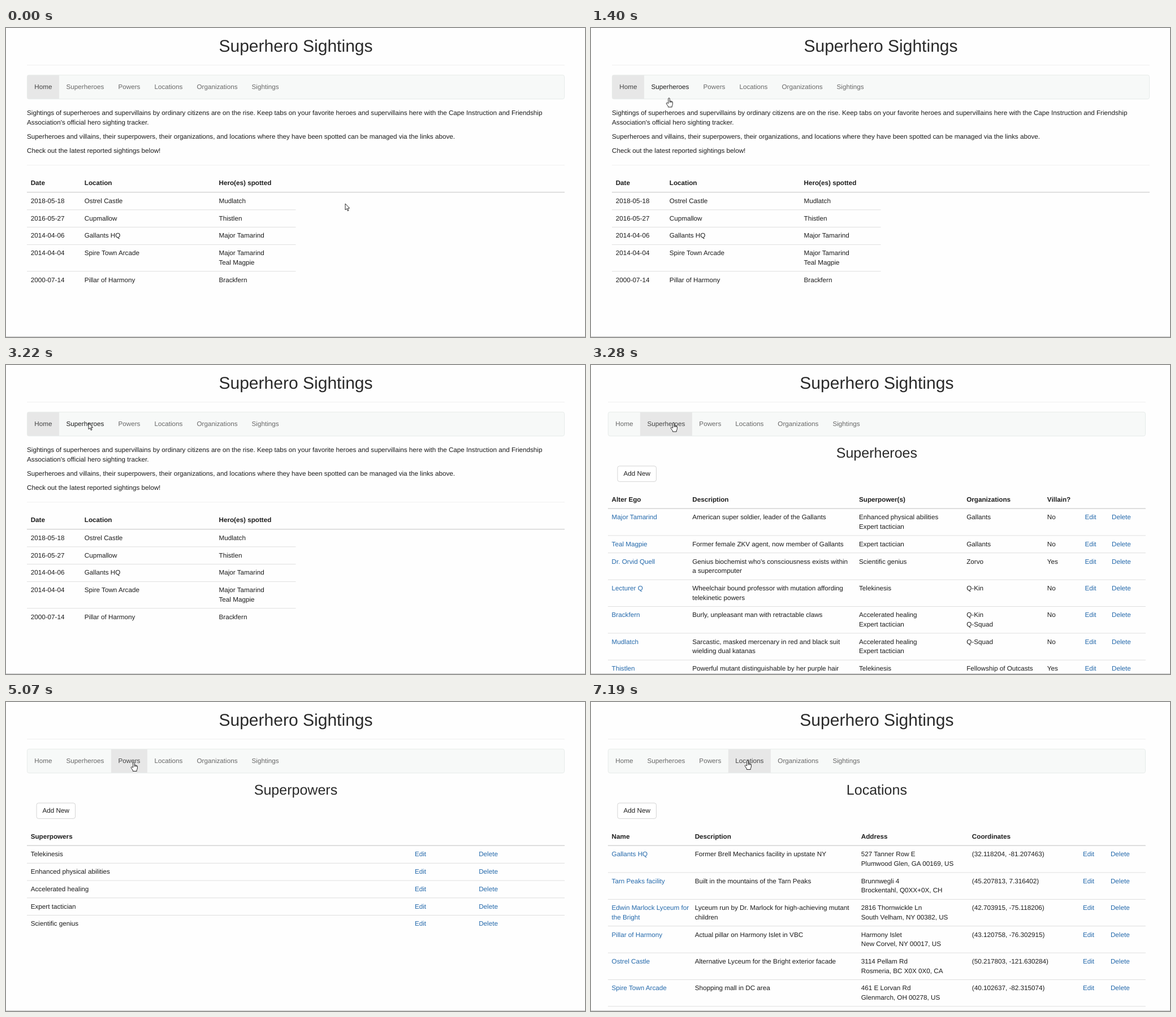
An HTML page for the animation above (8 s loop, 1024x547 px).

```html
<!DOCTYPE html>
<html lang="en">
<head>
<meta charset="utf-8">
<title>Sightings</title>
<style>
html, body { margin: 0; width: 100%; height: 100%; overflow: hidden; background: #fefefe; }
svg { display: block; width: 100vw; height: 100vh; }
text { font: 14px "Liberation Sans", Arial, sans-serif; fill: #1c1c1c; text-rendering: geometricPrecision; }
.th { font-weight: bold; }
.h1 { font-size: 36px; text-anchor: middle; fill: #2a2a2a; }
.h2 { font-size: 30px; text-anchor: middle; fill: #2a2a2a; }
.link { fill: #2469ab; }
.nav { fill: #686868; }
.hover { fill: #1c1c1c; }
.active { fill: #444; }
#cursor path { fill: #fff; stroke: #111; stroke-width: .9; stroke-linejoin: round; }
</style>
</head>
<body>
<svg viewBox="0 0 1024 547">
  <g id="pages"></g>
  <rect y="546" width="1024" height="1" fill="#c6c6c6"/>
  <g id="cursor">
    <path id="arrow" d="M0 0V11L2.6 8.8L4.3 12.8L6 12L4.3 8.2L7.6 8Z"/>
    <path id="hand" d="M-1.3 9.5V1.2Q-1.3 0 0 0T1.3 1.2V5Q2.8 4.6 3 5.6Q4.6 5.2 4.8 6.2Q6.4 6 6.4 7.6V10.5Q6.4 12.5 5.2 14V16H-1.6V14.5L-4.6 10.2Q-5.2 8.4 -3.6 8.3ZM1.3 5V8M3 5.6V8M4.8 6.2V8"/>
  </g>
</svg>
<script>
const $ = id => document.getElementById(id);
const SX = .8342, SY = .8313, LEFT = 44.35, TOP = -.9, WIDTH = 1140, LOOP = 8000;
const LINE = 20, PAD = 8, NAV_PAD = 15, NAV_TOP = 100.6, BODY_TOP = NAV_TOP + 72;
const NAV = ['Home', 'Superheroes', 'Powers', 'Locations', 'Organizations', 'Sightings'];

function make(tag, attrs = {}, content = '') {
  const el = document.createElementNS('http://www.w3.org/2000/svg', tag);
  for (const k in attrs) el.setAttribute(k, attrs[k]);
  el.textContent = content;
  return el;
}
function add(parent, ...spec) {
  const el = make(...spec);
  parent.append(el);
  return el;
}
const rect = (g, x, y, width, height, fill, more) => add(g, 'rect', { x, y, width, height, fill, ...more });
// y is the middle of the line box
const label = (g, x, y, s, cls = '', size = 14) => add(g, 'text', { x, y: y + size * .3465 - .7, class: cls }, s);

// Column weights share the full width; cells break lines at "|"
function table(g, top, weights, head, rows, linked = () => false, lineWidth = WIDTH) {
  const total = weights.reduce((a, b) => a + b);
  let sum = 0;
  const cols = weights.map(w => PAD + WIDTH * ((sum += w) - w) / total);
  const middle = PAD + LINE / 2;
  head.forEach((s, i) => label(g, cols[i], top + middle, s, 'th'));
  let y = top + LINE + 2 * PAD;
  rect(g, 0, y, WIDTH, 2, '#d9d9d9');
  y += 2;
  rows.forEach((row, r) => {
    if (r) rect(g, 0, y - 1, lineWidth, 1, '#d9d9d9');
    const cells = row.map(cell => cell.split('|'));
    cells.forEach((lines, i) => lines.forEach((s, n) =>
      label(g, cols[i], y + middle + LINE * n, s, linked(i) ? 'link' : '')));
    y += 2 * PAD + 1 + LINE * Math.max(...cells.map(lines => lines.length));
  });
}

// A page tall enough to scroll is shifted by half a scrollbar
function page(active, shift, heading) {
  const g = add($('pages'), 'g', { transform: `scale(${SX} ${SY}) translate(${LEFT - shift} ${TOP})` });
  label(g, WIDTH / 2, 39.8, 'Superhero Sightings', 'h1', 36);
  rect(g, 0, 79.6, WIDTH, 1, '#ebebeb');
  rect(g, .5, NAV_TOP + .5, WIDTH - 1, 51, '#f7f9f8', { rx: 4, stroke: '#e2e8e6' });
  const highlight = rect(g, 0, NAV_TOP + 1, 0, 50, '#e7e7e7');
  const edges = [1];
  const links = NAV.map((s, i) => {
    const link = label(g, edges[i] + NAV_PAD, NAV_TOP + 26, s);
    edges.push(edges[i] + link.getComputedTextLength() + 2 * NAV_PAD);
    return link;
  });
  highlight.setAttribute('x', edges[active]);
  highlight.setAttribute('width', edges[active + 1] - edges[active]);
  if (heading) {
    label(g, WIDTH / 2, BODY_TOP + 16.5, heading, 'h2', 30);
    rect(g, 20.5, BODY_TOP + 43.5, 82, 33, '#fff', { rx: 4, stroke: '#ccc' });
    label(g, 33, BODY_TOP + 60, 'Add New');
  }
  return { g, active, shift, links, edges };
}

const home = page(0, 0);
let introY = BODY_TOP + LINE / 2;
for (const paragraph of [
  'Sightings of superheroes and supervillains by ordinary citizens are on the rise. Keep tabs on your favorite heroes and supervillains here with the Cape Instruction and Friendship|Association\'s official hero sighting tracker.',
  'Superheroes and villains, their superpowers, their organizations, and locations where they have been spotted can be managed via the links above.',
  'Check out the latest reported sightings below!'
]) {
  for (const s of paragraph.split('|')) {
    label(home.g, 0, introY, s);
    introY += LINE;
  }
  introY += 10;
}
rect(home.g, 0, introY, WIDTH, 1, '#ebebeb');
table(home.g, introY + 21, [10, 25, 65], ['Date', 'Location', 'Hero(es) spotted'], [
  ['2018-05-18', 'Ostrel Castle', 'Mudlatch'],
  ['2016-05-27', 'Cupmallow', 'Thistlen'],
  ['2014-04-06', 'Gallants HQ', 'Major Tamarind'],
  ['2014-04-04', 'Spire Town Arcade', 'Major Tamarind|Teal Magpie'],
  ['2000-07-14', 'Pillar of Harmony', 'Brackfern']
], undefined, WIDTH / 2);

const LIST_TOP = BODY_TOP + 97;
const edit = row => [...row, 'Edit', 'Delete'];

const heroes = page(1, 8.5, 'Superheroes');
table(heroes.g, LIST_TOP, [15, 31, 20, 15, 7, 5, 7],
  ['Alter Ego', 'Description', 'Superpower(s)', 'Organizations', 'Villain?'], [
  ['Major Tamarind', 'American super soldier, leader of the Gallants', 'Enhanced physical abilities|Expert tactician', 'Gallants', 'No'],
  ['Teal Magpie', 'Former female ZKV agent, now member of Gallants', 'Expert tactician', 'Gallants', 'No'],
  ['Dr. Orvid Quell', "Genius biochemist who's consciousness exists within|a supercomputer", 'Scientific genius', 'Zorvo', 'Yes'],
  ['Lecturer Q', 'Wheelchair bound professor with mutation affording|telekinetic powers', 'Telekinesis', 'Q-Kin', 'No'],
  ['Brackfern', 'Burly, unpleasant man with retractable claws', 'Accelerated healing|Expert tactician', 'Q-Kin|Q-Squad', 'No'],
  ['Mudlatch', 'Sarcastic, masked mercenary in red and black suit|wielding dual katanas', 'Accelerated healing|Expert tactician', 'Q-Squad', 'No'],
  ['Thistlen', 'Powerful mutant distinguishable by her purple hair', 'Telekinesis', 'Fellowship of Outcasts', 'Yes']
].map(edit), i => i === 0 || i > 4);

const powers = page(2, 0, 'Superpowers');
table(powers.g, LIST_TOP, [60, 10, 14], ['Superpowers'],
  ['Telekinesis', 'Enhanced physical abilities', 'Accelerated healing', 'Expert tactician', 'Scientific genius']
    .map(s => edit([s])), i => i > 0);

const places = page(3, 8.5, 'Locations');
table(places.g, LIST_TOP, [15, 30, 20, 20, 5, 7], ['Name', 'Description', 'Address', 'Coordinates'], [
  ...[
    ['Gallants HQ', 'Former Brell Mechanics facility in upstate NY', '527 Tanner Row E|Plumwood Glen, GA 00169, US', '(32.118204, -81.207463)'],
    ['Tarn Peaks facility', 'Built in the mountains of the Tarn Peaks', 'Brunnwegli 4|Brockentahl, Q0XX+0X, CH', '(45.207813, 7.316402)'],
    ['Edwin Marlock Lyceum for|the Bright', 'Lyceum run by Dr. Marlock for high-achieving mutant|children', '2816 Thornwickle Ln|South Velham, NY 00382, US', '(42.703915, -75.118206)'],
    ['Pillar of Harmony', 'Actual pillar on Harmony Islet in VBC', 'Harmony Islet|New Corvel, NY 00017, US', '(43.120758, -76.302915)'],
    ['Ostrel Castle', 'Alternative Lyceum for the Bright exterior facade', '3114 Pellam Rd|Rosmeria, BC X0X 0X0, CA', '(50.217803, -121.630284)'],
    ['Spire Town Arcade', 'Shopping mall in DC area', '461 E Lorvan Rd|Glenmarch, OH 00278, US', '(40.102637, -82.315074)']
  ].map(edit),
  ['']
], i => i === 0 || i > 3);

// Each page: when it appears, and when the pointer turns to an arrow and back around the load
const VISITS = [
  { page: home, at: 0, busy: [0, 0] },
  { page: heroes, at: 3280, busy: [3200, 3280] },
  { page: powers, at: 5000, busy: [4930, 5060] },
  { page: places, at: 7120, busy: [7050, 7185] }
];

// Pointer moves in even steps along a curve, then rests at its end
const MOVES = [
  [0, 0, 1, 'M600 310V311'],
  [300, 1080, 11, 'M604 308C640 270 330 190 146 135'],
  [1170, 1401, 4, 'M146 114L138 124'],
  [1478, 1940, 7, 'M105 165C-40 290 60 365 414 346'],
  [2030, 2810, 11, 'M455 370C400 515 -190 430 146 104'],
  [3050, 3280, 4, 'M146 104V102'],
  [4060, 4453, 6, 'M150 106Q190 112 222.5 121.5'],
  [4531, 4610, 2, 'M230 112L235 102'],
  [4770, 4770, 1, 'M235 102L226 106.5'],
  [6660, 6910, 4, 'M236 106.5L277 103.5']
].map(([from, to, steps, d]) => ({ from, to, steps, curve: make('path', { d }) }));

function pointer(t) {
  const { from, to, steps, curve } = MOVES.findLast(m => t >= m.from);
  const last = steps - 1;
  // The small bias absorbs rounding of the step times
  const k = last ? Math.min(1, Math.floor((t - from) / (to - from) * last + .1) / last) : 1;
  return curve.getPointAtLength(k * curve.getTotalLength());
}

function draw(t) {
  const current = VISITS.findLast(v => t >= v.at).page;
  const { x, y } = pointer(t);
  const localX = x / SX - LEFT + current.shift;
  const localY = y / SY - TOP - NAV_TOP;
  const inBar = localY > 0 && localY < 52;
  const over = inBar ? NAV.findIndex((_, i) => localX >= current.edges[i] && localX < current.edges[i + 1]) : -1;
  for (const { page } of VISITS) page.g.style.display = page === current ? '' : 'none';
  current.links.forEach((el, i) =>
    el.setAttribute('class', i === current.active ? 'active' : i === over ? 'hover' : 'nav'));
  const hand = over >= 0 && !VISITS.some(({ busy }) => t >= busy[0] && t < busy[1]);
  $('hand').style.display = hand ? '' : 'none';
  $('arrow').style.display = hand ? 'none' : '';
  $('cursor').setAttribute('transform', `translate(${x} ${y})`);
}

const start = performance.now();
(function tick() {
  draw((performance.now() - start) % LOOP);
  requestAnimationFrame(tick);
})();
</script>
</body>
</html>
```
